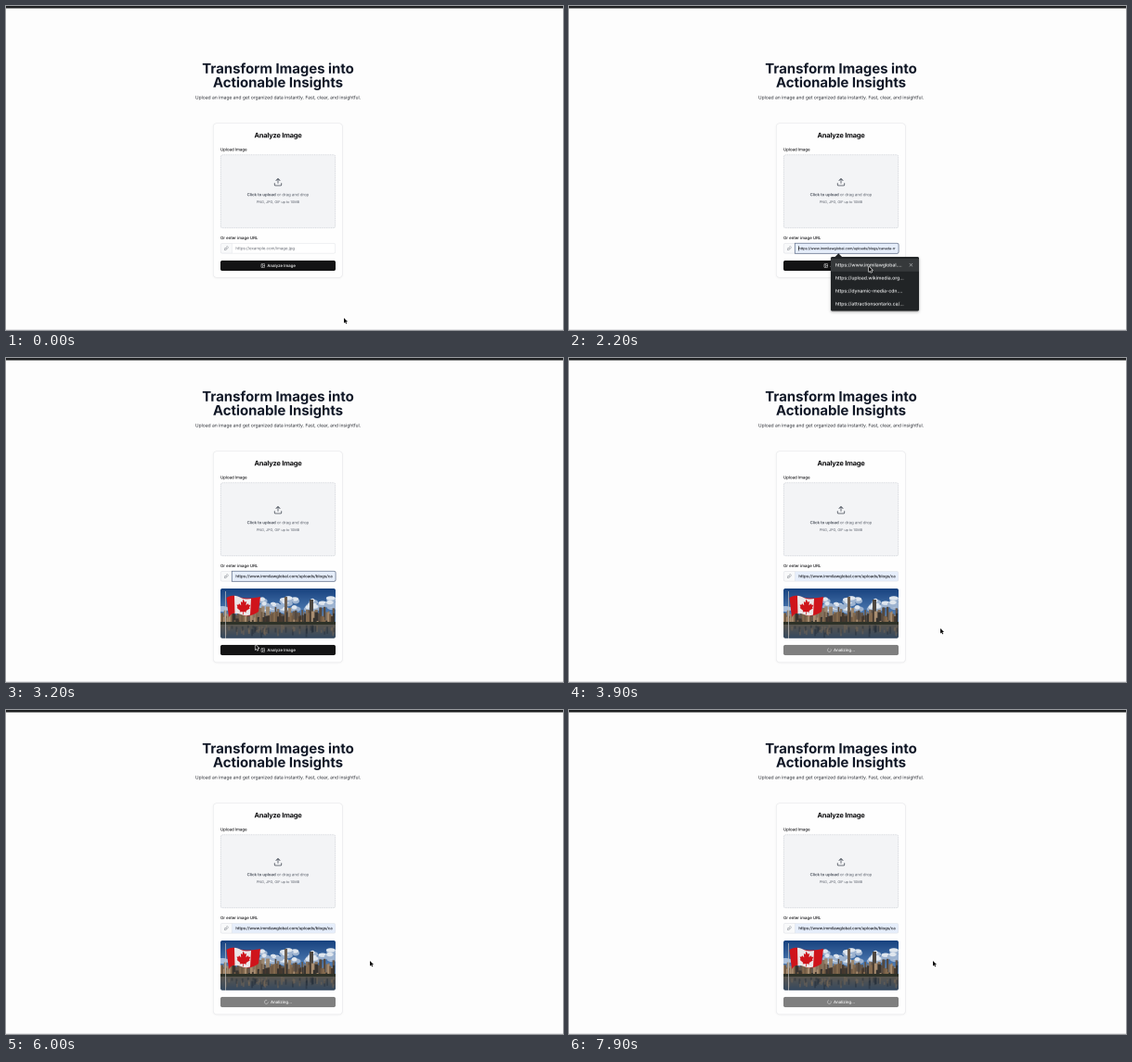
These frames come from a looping animation (600x350 px, 8000 ms). An HTML page with a canvas:

```html
<!DOCTYPE html>
<html lang="en">
<head>
<meta charset="utf-8">
<title>Analyze Image</title>
<style>
  html, body { margin: 0; width: 100%; height: 100%; overflow: hidden; background: #fdfdfd; }
  canvas { display: block; width: 600px; height: 350px; }
</style>
</head>
<body>
<canvas id="stage"></canvas>
<script>
const W = 600, H = 350, LOOP = 8000, STEP = 100;
const OPEN = 1000, PICK = 2500, LOADED = 2600, SUBMIT = 3400;
const stage = document.getElementById('stage');
const dpr = window.devicePixelRatio || 1;
const scale = 4 * dpr;
stage.width = W * dpr;
stage.height = H * dpr;
const screen2d = stage.getContext('2d');
screen2d.imageSmoothingQuality = 'high';

// drawn large and scaled down, so that small text keeps even spacing
const buffer = document.createElement('canvas');
buffer.width = W * scale;
buffer.height = H * scale;
const ctx = buffer.getContext('2d');
ctx.scale(scale, scale);

const FONT = 'Inter, "Open Sans", sans-serif';
const URL_TEXT = 'https://www.immilawglobal.com/uploads/blogs/canada-m';
const SUGGESTIONS = [
  'https://www.immilawglobal....',
  'https://upload.wikimedia.org...',
  'https://dynamic-media-cdn....',
  'https://attractionsontario.ca/...'
];

// time, x, y of the pointer tip
const POINTER = [
  [100, 364, 337], [900, 300, 261], [1300, 300, 261], [2100, 323, 281.5],
  [2500, 323, 281.5], [3200, 268.5, 309.5], [3400, 268.5, 309.5],
  [3900, 400, 292], [4200, 405.5, 287], [4900, 392, 271]
];

const ICONS = {
  upload: 'M21 15v4a2 2 0 0 1-2 2H5a2 2 0 0 1-2-2v-4M17 8l-5-5-5 5M12 3v12',
  image: 'M5 3h14a2 2 0 0 1 2 2v14a2 2 0 0 1-2 2H5a2 2 0 0 1-2-2V5a2 2 0 0 1 2-2z' +
    'M11 9a2 2 0 1 1-4 0a2 2 0 1 1 4 0M21 15l-3.086-3.086a2 2 0 0 0-2.828 0L6 21',
  link: 'M10 13a5 5 0 0 0 7.54.54l3-3a5 5 0 0 0-7.07-7.07l-1.72 1.71' +
    'M14 11a5 5 0 0 0-7.54-.54l-3 3a5 5 0 0 0 7.07 7.07l1.71-1.71',
  loader: 'M21 12a9 9 0 1 1-6.219-8.56'
};

function pointerAt(t) {
  let prev = POINTER[0];
  for (const next of POINTER) {
    if (t <= next[0]) {
      const u = (t - prev[0]) / (next[0] - prev[0] || 1);
      const k = t < prev[0] ? 0 : u * u * (3 - 2 * u);
      return { x: prev[1] + (next[1] - prev[1]) * k, y: prev[2] + (next[2] - prev[2]) * k };
    }
    prev = next;
  }
  return { x: prev[1], y: prev[2] };
}

// y is the middle of the capital letters
function text(str, x, y, size, color, weight = 400, align = 'left', spacing = 0) {
  ctx.font = `${weight} ${size}px ${FONT}`;
  ctx.letterSpacing = `${spacing * size}px`;
  ctx.textRendering = 'geometricPrecision';
  ctx.textAlign = align;
  ctx.fillStyle = color;
  ctx.fillText(str, x, y + size * 0.36);
  return ctx.measureText(str).width;
}

function box(x, y, w, h, r, fill, stroke, line = 0.5) {
  ctx.beginPath();
  ctx.roundRect(x, y, w, h, r);
  if (fill) { ctx.fillStyle = fill; ctx.fill(); }
  if (stroke) { ctx.strokeStyle = stroke; ctx.lineWidth = line; ctx.stroke(); }
}

function rect(x, y, w, h, color) {
  ctx.fillStyle = color;
  ctx.fillRect(x, y, w, h);
}

function shadowed(alpha, blur, dy, draw) {
  ctx.save();
  ctx.shadowColor = `rgba(0,0,0,${alpha})`;
  ctx.shadowBlur = blur * scale;
  ctx.shadowOffsetY = dy * scale;
  draw();
  ctx.restore();
}

function icon(name, x, y, size, color, angle = 0) {
  ctx.save();
  ctx.translate(x, y);
  ctx.rotate(angle);
  ctx.scale(size / 24, size / 24);
  ctx.translate(-12, -12);
  ctx.strokeStyle = color;
  ctx.lineWidth = 2;
  ctx.lineCap = ctx.lineJoin = 'round';
  ctx.stroke(new Path2D(ICONS[name]));
  ctx.restore();
}

function fillPath(d, color) {
  ctx.fillStyle = color;
  ctx.fill(new Path2D(d));
}

function clipped(x, y, w, h, r, draw) {
  ctx.save();
  ctx.beginPath();
  ctx.roundRect(x, y, w, h, r);
  ctx.clip();
  draw();
  ctx.restore();
}

function random(seed) {
  return () => (seed = (seed * 16807) % 2147483647) / 2147483647;
}

function shade(y, h, top, bottom) {
  const g = ctx.createLinearGradient(0, y, 0, y + h);
  g.addColorStop(0, top);
  g.addColorStop(1, bottom);
  rect(0, y, 124, h, g);
}

function cloud(x, y, rx, ry, color) {
  ctx.fillStyle = color;
  ctx.beginPath();
  ctx.ellipse(x, y, rx, ry, 0, 0, 7);
  ctx.fill();
}

function buildings(rand, count, base, minH, maxH, colors) {
  for (let i = 0; i < count; i++) {
    const w = 1.5 + rand() * 2.5, h = minH + rand() * (maxH - minH);
    rect(i * 124 / count - 1, base - h, w, h, colors[Math.floor(rand() * colors.length)]);
  }
}

function flag() {
  rect(5.2, 3, 0.7, 51, '#c4c4c4');
  fillPath('M6.5 10Q13 6 20 9T43 9L41 25Q31 32 22 28T9 31Z', '#cf141b');
  fillPath('M15 7.8Q18 7.8 22 10T33 11L32 28.5Q27 30 22 28T15.5 27.5Z', '#ebe7e8');
  fillPath('M24.5 11.5l1.8 3.3 1.7-.9-.5 4.2 2.4-1.9.4 1.5 2 .2-1.3 2.7.8.8' +
    '-4.2 2.8.4 1.4-3.2-.5-.1 3h-.7l.1-3-3.4.2.6-1.3-3.7-3.2.9-.6-1-2.7 2 .1.6-1.4 2.1 2.2-.3-4.4 1.6 1.1z', '#cf141b');
}

function photo(x, y) {
  clipped(x, y, 124, 53.8, 2, () => {
    ctx.translate(x, y);
    const rand = random(77);
    shade(0, 40, '#18427f', '#6c9bd0');
    for (let i = 0; i < 26; i++) {
      const cx = 46 + rand() * 76, cy = 10 + rand() * 12;
      cloud(cx, cy + 2, 4 + rand() * 3, 3, '#9db3d0');
      cloud(cx - 1, cy, 2 + rand() * 3, 2.2, '#dfe6ee');
    }
    cloud(2, 22, 7, 3, '#a9bfdb');
    buildings(rand, 52, 38, 7, 19, ['#85715d', '#64574c', '#9b8770', '#54493f']);
    rect(69, 9, 3, 29, '#6d5e50');
    rect(96, 12, 4, 26, '#4d4741');
    buildings(rand, 64, 38.5, 3, 14, ['#44382e', '#a88d70', '#705a44', '#37332f', '#846a4e']);
    rect(0, 36, 124, 3.5, '#2e3228');
    shade(39, 15, '#5b5750', '#34485f');
    for (let i = 0; i < 60; i++) {
      const color = i % 2 ? 'rgba(128,108,86,.4)' : 'rgba(28,38,52,.4)';
      rect(rand() * 122, 39 + rand() * 6, 1.8, 3 + rand() * 6, color);
    }
    flag();
  });
}

function field(y, state, focused) {
  const filled = state !== 'empty';
  const top = y - 5.55, h = 11.1;
  clipped(231, top, 124, h, 1.8, () => {
    rect(231, top, 12.3, h, '#f8f9fa');
    rect(243.3, top, 112, h, filled ? '#e6eefb' : '#fff');
  });
  box(231.2, top + 0.2, 123.6, h - 0.4, 1.8, null, '#e2e4e8');
  box(231.2, top + 0.2, 12.1, h - 0.4, [1.8, 0, 0, 1.8], null, '#e2e4e8');
  icon('link', 237.2, y, 4.9, '#6b7079');
  if (focused) box(243.3, top, 111.8, h, [0, 1.8, 1.8, 0], null, filled ? '#6a7892' : '#4a4e55', 0.8);
  clipped(245, y - 5, 106.4, 10, 0, () => {
    if (state === 'empty') text('https://example.com/image.jpg', 247.4, y, 4.34, '#6b6f78');
    if (state === 'preview') text(URL_TEXT, 247.4, y, 3.78, '#101218', 500);
    if (state === 'filled') text(URL_TEXT, 247.4, y, 4.33, '#101218', 450);
  });
  if (focused && state !== 'filled') rect(247, y - 2.8, 0.5, 5.6, '#111');
}

function button(y, t) {
  const busy = t >= SUBMIT;
  box(231, y - 5.55, 124, 11.1, 1.8, busy ? '#7f7f7f' : '#131314');
  if (busy) {
    icon('loader', 280.4, y, 4.95, '#f4f4f4', t % 1000 / 1000 * Math.PI * 2);
    text('Analizing...', 285, y, 4.33, '#fafafa', 500);
  } else {
    icon('image', 276.8, y, 4.95, '#fafafa');
    text('Analyze Image', 281.4, y, 4.33, '#fafafa', 500);
  }
}

function page(t, state) {
  const loaded = t >= LOADED;
  const dy = loaded ? -26 : 0;
  const cardH = loaded ? 228 : 166.5;
  rect(0, 0, W, H, '#fdfdfd');
  rect(0, 0, W, 2.5, '#1e2022');
  rect(0, 349, W, 1, '#e4e5e7');

  text('Transform Images into', 293, 67.4 + dy, 14.9, '#111827', 700, 'center');
  text('Actionable Insights', 293, 82.4 + dy, 14.9, '#111827', 700, 'center');
  text('Upload an image and get organized data instantly. Fast, clear, and insightful.',
    293, 98.6 + dy, 4.96, '#2b2e35', 400, 'center');

  shadowed(0.07, 2, 0.5, () => box(223.4, 126.8 + dy, 138.9, cardH, 3.5, '#fefefe'));
  box(223.4, 126.8 + dy, 138.9, cardH, 3.5, null, '#e5e6e9');
  text('Analyze Image', 293, 139.6 + dy, 7.42, '#09090b', 700, 'center', -0.025);
  text('Upload Image', 231, 155 + dy, 4.33, '#111114', 500);

  ctx.setLineDash([1, 0.7]);
  box(231.2, 160.8 + dy, 123.6, 79, 2.2, '#f3f4f6', '#c5c9d0', 0.6);
  ctx.setLineDash([]);
  icon('upload', 293, 190.2 + dy, 10, '#4f5560');
  const w = text('Click to upload', 259.6, 203.6 + dy, 4.34, '#4a505b', 600);
  text(' or drag and drop', 259.6 + w, 203.6 + dy, 4.34, '#5c626d');
  text('PNG, JPG, GIF up to 10MB', 293, 211.6 + dy, 3.72, '#5c626d', 400, 'center');

  text('Or enter image URL', 231, 250.5 + dy, 4.33, '#111114', 500);
  field(261.8 + dy, state, t >= OPEN && t < SUBMIT);
  if (loaded) photo(231, 249);
  button(loaded ? 315.5 : 280.5, t);
}

function menu(hover) {
  shadowed(0.35, 3, 1, () => box(282, 271, 95, 58.5, 1.5, '#212426'));
  fillPath('M286 271.5L290.3 267.3L294.6 271.5Z', '#212426');
  if (hover) {
    rect(282, 273, 95, 13.8, '#36393b');
    ctx.strokeStyle = '#b9bbbd';
    ctx.lineWidth = 0.5;
    ctx.stroke(new Path2D('M366.7 278l3.4 3.4M370.1 278l-3.4 3.4'));
  }
  SUGGESTIONS.forEach((s, i) => text(s, 286.8, 279.8 + i * 14, 5.06, '#f1f2f3', 500));
}

function pointer({ x, y }, beam) {
  ctx.save();
  ctx.translate(x, y);
  ctx.lineJoin = 'round';
  if (beam) {
    ctx.strokeStyle = '#222';
    ctx.lineWidth = 0.7;
    ctx.stroke(new Path2D('M-1.3-2.5Q0-2.5 0-1.8V3.8Q0 4.5-1.3 4.5M1.3-2.5Q0-2.5 0-1.8M0 3.8Q0 4.5 1.3 4.5'));
  } else {
    const arrow = new Path2D('M0 0V5.6L1.3 4.4L2.2 6.4L3.2 6L2.3 4H4Z');
    ctx.strokeStyle = '#fff';
    ctx.lineWidth = 1.1;
    ctx.stroke(arrow);
    ctx.fillStyle = '#0a0a0a';
    ctx.fill(arrow);
  }
  ctx.restore();
}

function draw(t) {
  const tip = pointerAt(t);
  const open = t >= OPEN && t < PICK;
  const hover = open && tip.y > 273;
  const state = t >= PICK ? 'filled' : hover ? 'preview' : 'empty';
  page(t, state);
  if (open) menu(hover);
  pointer(tip, t < PICK && tip.y < 267);
  screen2d.drawImage(buffer, 0, 0, stage.width, stage.height);
}

let shown = -1;
function tick() {
  const t = Math.floor(performance.now() % LOOP / STEP) * STEP;
  if (t !== shown) draw(shown = t);
  requestAnimationFrame(tick);
}
tick();
</script>
</body>
</html>
```
